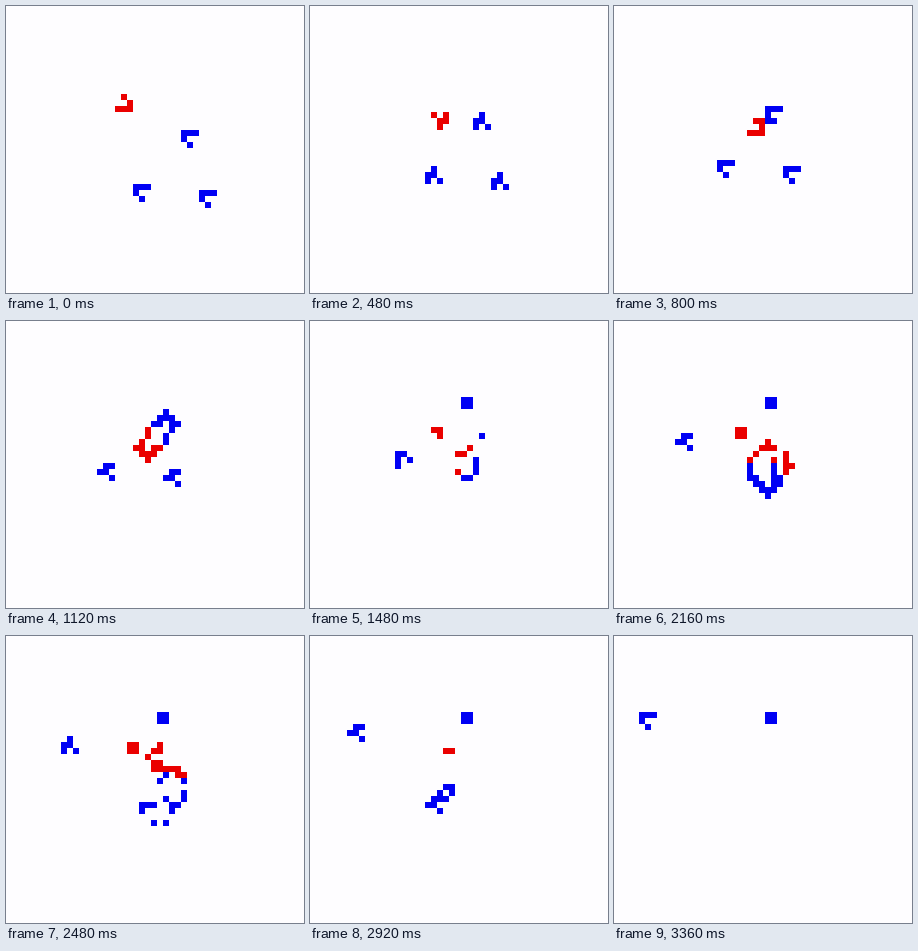
Write an HTML page with a canvas that moves like this. It is 298 by 287 pixels and loops after 3400 ms.

```html
<!DOCTYPE html>
<html lang="en">
<head>
<meta charset="utf-8">
<title>Two-colour Life</title>
<style>
html, body { margin: 0; width: 100%; height: 100%; overflow: hidden; background: #fefdff; }
canvas { display: block; }
</style>
</head>
<body>
<canvas id="stage" width="298" height="287"></canvas>
<script>
const ctx = document.getElementById('stage').getContext('2d');
const COLS = 50, ROWS = 48, CELL = 6, LEFT = 1, TOP = 4;
const LOOP = 3400, TICK = 40, LAST = 68;
const RED = 1, BLUE = 2;
const COLORS = ['', '#ea0000', '#0000f4'];

// Uneven pace of the simulation: [tick, generation]
const PACE = [[0, 0], [12, 9], [28, 23], [47, 38], [62, 49], [73, 59], [84, LAST]];

function place(grid, col, row, pattern, color) {
  pattern.forEach((line, y) => [...line].forEach((c, x) => {
    if (c === 'X') grid[(row + y) * COLS + col + x] = color;
  }));
}

// Life rule; a newborn cell takes the majority colour of its three parents
function evolve(grid) {
  const next = new Uint8Array(grid.length);
  for (let y = 1; y < ROWS - 1; y++) {
    for (let x = 1; x < COLS - 1; x++) {
      const at = y * COLS + x, count = [0, 0, 0];
      for (let dy = -1; dy <= 1; dy++)
        for (let dx = -1; dx <= 1; dx++)
          if (dx || dy) count[grid[at + dy * COLS + dx]]++;
      const alive = count[RED] + count[BLUE];
      if (grid[at]) next[at] = alive === 2 || alive === 3 ? grid[at] : 0;
      else if (alive === 3) next[at] = count[RED] > count[BLUE] ? RED : BLUE;
    }
  }
  return next;
}

const first = new Uint8Array(COLS * ROWS);
const northWest = ['XXX', 'X..', '.X.'];
place(first, 18, 14, ['.X.', '..X', 'XXX'], RED);
place(first, 29, 20, northWest, BLUE);
place(first, 21, 29, northWest, BLUE);
place(first, 32, 30, northWest, BLUE);

const history = [first];
while (history.length <= LAST) history.push(evolve(history[history.length - 1]));

function generationAt(tick) {
  const i = Math.max(1, PACE.findIndex(p => p[0] >= tick));
  const [t0, g0] = PACE[i - 1], [t1, g1] = PACE[i];
  return Math.round(g0 + (tick - t0) * (g1 - g0) / (t1 - t0));
}

function draw() {
  const tick = Math.floor(performance.now() % LOOP / TICK);
  ctx.fillStyle = '#fefdff';
  ctx.fillRect(0, 0, 298, 287);
  history[generationAt(tick)].forEach((color, i) => {
    if (!color) return;
    ctx.fillStyle = COLORS[color];
    ctx.fillRect(LEFT + i % COLS * CELL, TOP + Math.floor(i / COLS) * CELL, CELL, CELL);
  });
  requestAnimationFrame(draw);
}
draw();
</script>
</body>
</html>
```
